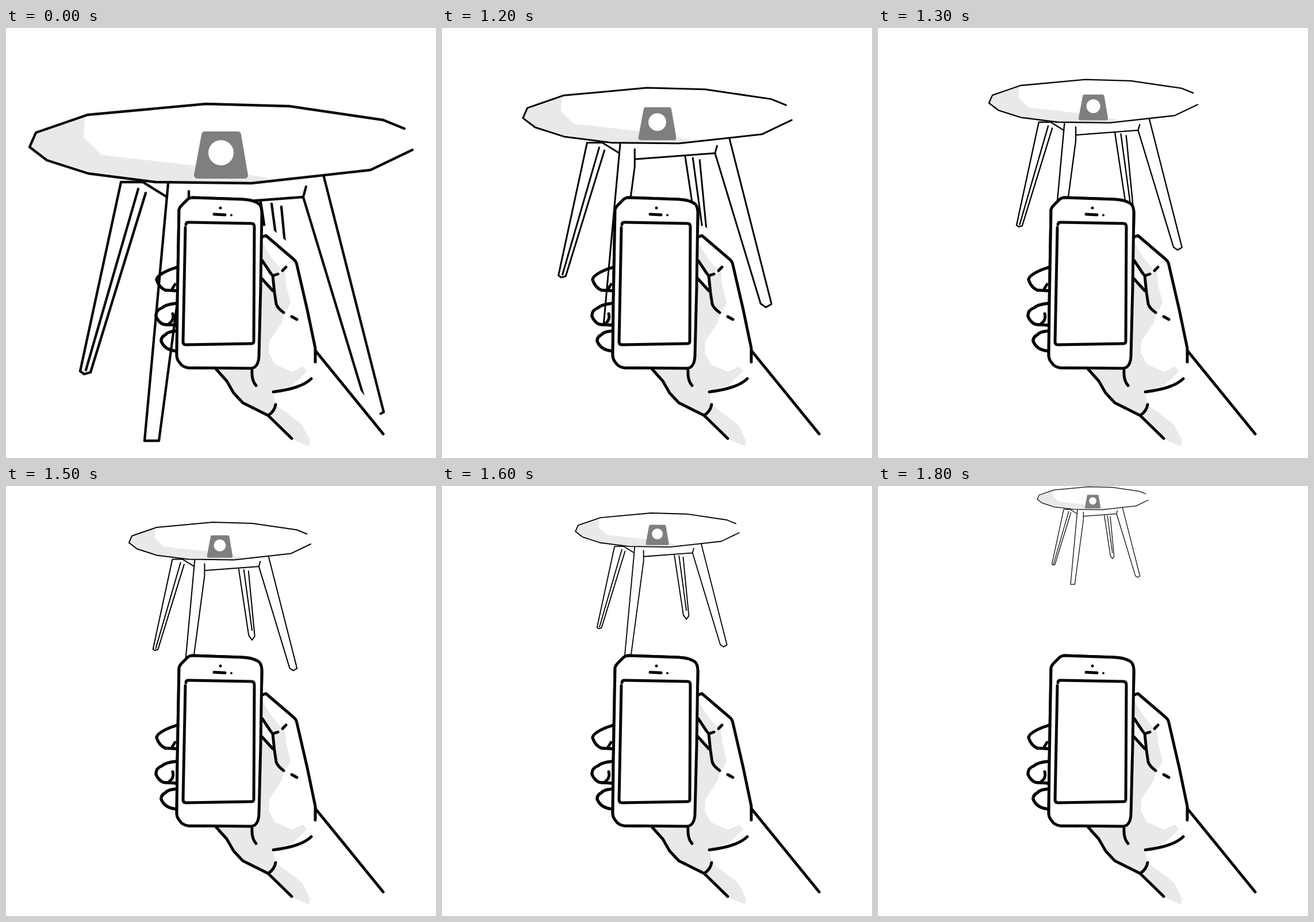
Animation of 748 by 748 pixels, one loop 2900 ms. Source, as an HTML page:

```html
<!DOCTYPE html>
<html lang="en">
<head>
<meta charset="utf-8">
<title>Phone and table</title>
<style>
html, body { margin: 0; width: 100%; height: 100%; overflow: hidden; background: #fff; }
svg { display: block; width: 100%; height: 100%; }
path { fill: none; stroke: #050505; stroke-width: 5; stroke-linecap: round; stroke-linejoin: round; }
#table path { stroke-width: 4.3; }
path.shade { fill: #e9e9e9; stroke: none; }
#table path.plate { fill: #7f7f7f; stroke: #7f7f7f; stroke-width: 12; }
.halo path { fill: #fff; stroke: #fff; stroke-width: 34; }
path.white { fill: #fff; }
</style>
</head>
<body>
<svg viewBox="0 0 748 748">
  <defs>
    <path id="phone" d="M301 316Q302 312 306 308L315 299Q319 295 325 295L411 298Q432 299 441 307Q445 312 445 322L443 450L440 571Q439 591 426 592L317 591Q307 590 302 582Q297 576 297 569L298 480Z"/>
    <path id="fingers" d="M298 416L286 420Q262 430 262 438Q266 451 277 456L296 457M296 479Q277 481 271 487Q260 491 261 502Q268 517 280 516L296 517M296 527Q282 528 278 533Q269 538 270 545Q276 560 296 562"/>
  </defs>

  <g id="table">
    <path class="shade" d="M137 155L135 190L167 221L335 240L462 262L428 268L263 266L145 250L72 228L43 207L53 184Z"/>
    <path d="M693 175L656 160L493 136L348 132L142 151L52 182L41 207L71 230L143 253L260 268L427 270L634 247L707 212"/>
    <path class="plate" d="M346 186H403L415 256H333Z"/>
    <circle cx="374" cy="217" r="22" fill="#fff"/>
    <!-- back left, front left, front right, back right legs -->
    <path d="M280 294L238 268H200L129 597L136 602L147 599L243 287M230 280L139 595"/>
    <path d="M282 271L241 718H266L318 328V284"/>
    <path d="M318 309L517 294L522 276M517 294L630 667L643 676L657 668L553 259"/>
    <path d="M443 302L480 547L492 564L502 550L479 311M462 306L492 528"/>
  </g>

  <g class="halo">
    <use href="#phone"/>
    <use href="#fingers"/>
    <path d="M450 361L505 408L524 490L538 561L656 706L497 714L456 674L412 652L366 594L440 500Z"/>
  </g>

  <g id="hand">
    <path class="shade" d="M446 374L462 400L478 419L472 428L464 430L446 404Z"/>
    <path class="shade" d="M466 431L485 420L487 445L495 478L489 490L480 491L471 480Z"/>
    <path class="shade" d="M444 440L463 457L470 484L483 496L480 512L458 545L457 565L468 585L497 598L517 589L524 597L500 620L465 634L469 655L515 690L529 718L527 728L500 716L457 674L412 652L396 636L366 594L440 592Z"/>
    <path d="M447 363L452 361L500 402Q505 406 506 412L524 490L538 557V581M538 561L656 706"/>
    <path d="M446 405L460 426L464 431L473 428M481 422L487 416M464 431L467 460L470 480Q472 487 483 495M497 502L506 507M445 436L464 457"/>
    <path d="M366 594L384 614L396 635L412 652L456 674L497 714M469 655Q467 667 456 674M428 596Q427 613 435 622M465 633Q514 627 531 610"/>
    <use href="#fingers"/>
    <path d="M294 446L289 454M290 497Q293 508 284 514"/>
    <g><path class="white" d="M301 316Q302 312 306 308L315 299Q319 295 325 295L411 298Q432 299 441 307Q445 312 445 322L443 450L440 571Q439 591 426 592L317 591Q307 590 302 582Q297 576 297 569L298 480Z"/></g>
    <path d="M312 347L308 546Q308 551 313 551L427 549Q431 549 431 545L432 346Q432 340 427 340L317 338Q313 338 313 342"/>
    <path d="M362 324L381 325"/>
    <circle cx="373" cy="313" r="2.5"/>
    <circle cx="392" cy="325.500" r="2"/>
  </g>
</svg>
<script>
const LOOP = 2900, HOLD = 1100, STEP = 100;
// Table poses: scale, x, y
const poses = [
  [1, 0, 0],
  [.859, 52.800, 4.600],
  [.702, 112, 11.300],
  [.545, 170.700, 17.700],
  [.51, 182.600, 9],
  [.4745, 194.500, .4],
  [.428, 214.500, -9.500],
  [.359, 240, -23.300],
  [.29, 265.100, -37]
];
const table = document.getElementById("table");

function draw(now) {
  const t = now % LOOP;
  const i = t < HOLD ? 0 : Math.min(poses.length - 1, 1 + Math.floor((t - HOLD) / STEP));
  const [s, x, y] = poses[i];
  table.setAttribute("transform", `translate(${x} ${y}) scale(${s})`);
  requestAnimationFrame(draw);
}
draw(performance.now());
</script>
</body>
</html>
```
